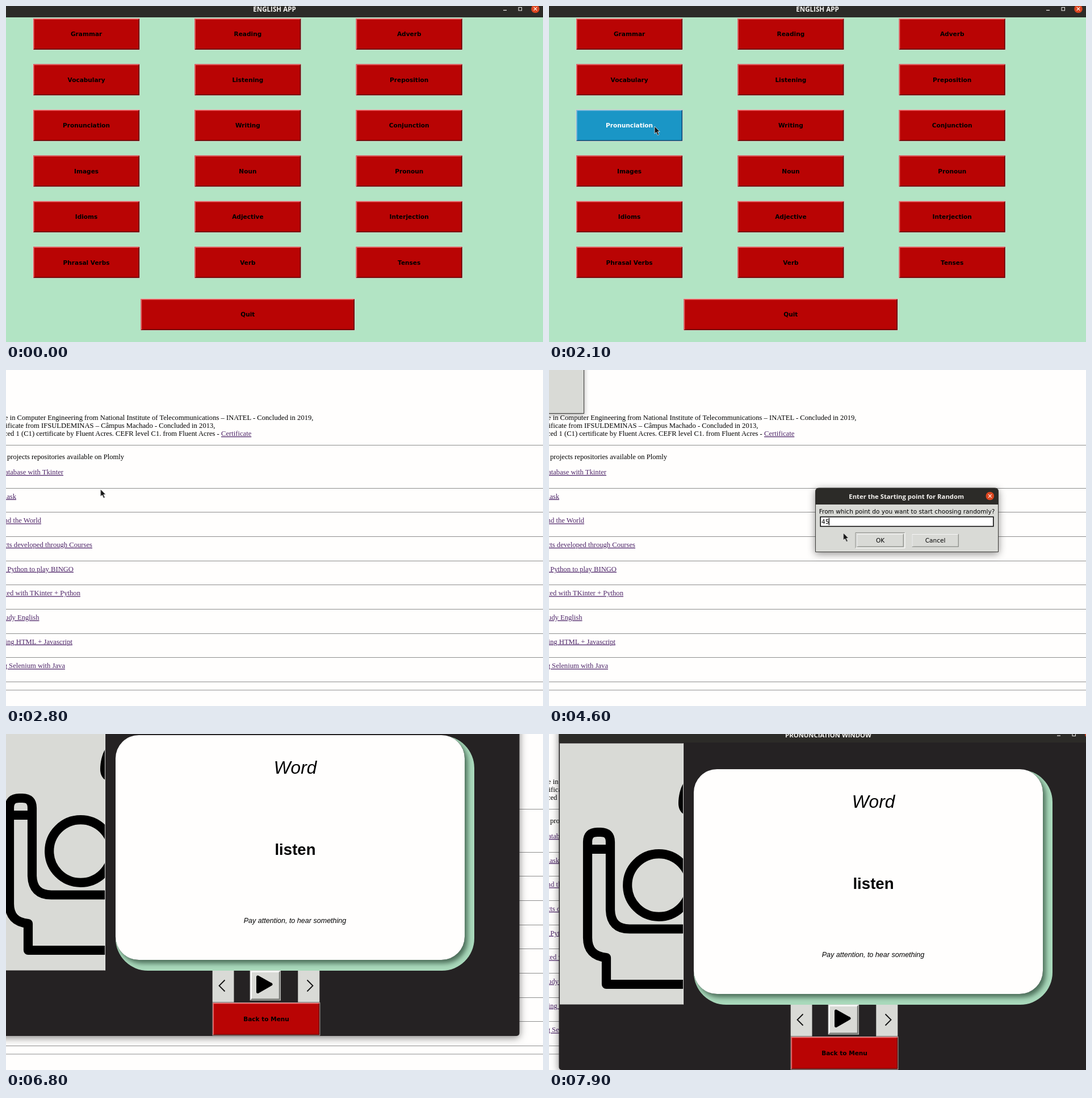
Write an HTML page that moves like this. It is 946x592 px and loops after 8000 ms.

```html
<!DOCTYPE html>
<html lang="en">
<head>
<meta charset="utf-8">
<title>English app</title>
<style>
html, body { margin: 0; width: 100%; height: 100%; overflow: hidden; background: #fffefd; }
svg { display: block; width: 946px; height: 592px; }
text { white-space: pre; }
.serif { font: 12.64px "Liberation Serif", serif; }
.link { fill: #4d2468; text-decoration: underline; }
.title { font: bold 11.3px "Open Sans", sans-serif; fill: #f6f4f1; }
.label { font: bold 10.55px "DejaVu Sans", sans-serif; }
.ui { font: 10.53px "DejaVu Sans", sans-serif; }
.sans { font-family: "Liberation Sans", sans-serif; }
.mid { text-anchor: middle; }
.end { text-anchor: end; }

/* one 8 s loop, 100 ms = 1.25 % */
#cursor, #menu, #buttons, #hover, #press, #dialog, #small, #player, #edge, #caret, #four, #five {
  animation: 8s step-end infinite;
}
#cursor { animation-name: cursor; }
#menu { animation-name: menu; }
#buttons { animation-name: buttons; }
#hover { animation-name: hover; }
#press { animation-name: press; }
#dialog { animation-name: dialog; transform-origin: 630px 264px; }
#small { animation-name: small; }
#player { animation-name: player; }
#edge { animation-name: edge; }
#caret { animation-name: caret; }
#four { animation-name: four; }
#five { animation-name: five; }

@keyframes cursor {
  0% { transform: translate(-50px, -50px); }
  3.75% { transform: translate(345px, 21px); }
  6.25% { transform: translate(291px, 174px); }
  10% { transform: translate(255px, 205px); }
  11.25% { transform: translate(232px, 222px); }
  12.5% { transform: translate(228px, 223px); }
  26.25% { transform: translate(186px, 212px); }
  27.5% { transform: translate(166.5px, 210px); }
  41.25% { transform: translate(215px, 150px); }
  42.5% { transform: translate(370px, 72px); }
  43.75% { transform: translate(-50px, -50px); }
  46.25% { transform: translate(513px, 282px); }
  50% { transform: translate(518.5px, 287px); }
  62.5% { transform: translate(524px, 290px); }
  63.75% { transform: translate(529px, 293px); }
  66.25% { transform: translate(548px, 297px); }
  67.5% { transform: translate(573px, 304px); }
  73.75% { transform: translate(470px, 296px); }
  75% { transform: translate(375px, 281px); }
  77.5% { transform: translate(329.5px, 84px); }
  80%, 100% { transform: translate(-50px, -50px); }
}
@keyframes menu { 0% { visibility: visible; } 35%, 100% { visibility: hidden; } }
@keyframes buttons { 0% { opacity: 1; } 32.5%, 100% { opacity: 0; } }
@keyframes hover { 0% { opacity: 0; } 11.25% { opacity: 1; } 32.5%, 100% { opacity: 0; } }
@keyframes press { 0% { opacity: 0; } 31.25% { opacity: 1; } 32.5%, 100% { opacity: 0; } }
@keyframes dialog {
  0% { opacity: 0; transform: scale(.9); }
  36.25% { opacity: .5; transform: scale(.95); }
  37.5% { opacity: 1; transform: none; }
  68.75% { opacity: .5; transform: scale(.95); }
  70%, 100% { opacity: 0; transform: scale(.9); }
}
@keyframes small { 0% { opacity: 0; } 36.25% { opacity: .5; } 37.5% { opacity: 1; } 70%, 100% { opacity: 0; } }
@keyframes player {
  0% { visibility: hidden; transform: none; }
  70% { visibility: visible; transform: translate(-115px, -98px); }
  83.75% { visibility: visible; transform: translate(-95px, -88px); }
  85% { visibility: visible; transform: translate(-62px, -60px); }
  86.25% { visibility: visible; transform: translate(-22px, -19px); }
  90% { visibility: visible; transform: translate(-16px, -14px); }
  91.25% { visibility: visible; transform: translate(-11px, -10px); }
  92.5% { visibility: visible; transform: translate(-7px, -6px); }
  93.75% { visibility: visible; transform: translate(-4px, -3px); }
  95% { visibility: visible; transform: translate(-2px, -1px); }
  98.75%, 100% { visibility: visible; transform: none; }
}
@keyframes edge {
  0% { filter: drop-shadow(0 1px 3px rgba(0, 0, 0, .2)); }
  83.75%, 100% { filter: drop-shadow(0 3px 7px rgba(0, 0, 0, .5)); }
}
@keyframes caret {
  0% { opacity: 0; transform: none; }
  43.75% { opacity: 1; transform: none; }
  46.25% { opacity: 0; transform: none; }
  53.75% { opacity: 1; transform: translateX(6.7px); }
  57.5% { opacity: 1; transform: translateX(13.2px); }
  62.5% { opacity: 0; transform: translateX(13.2px); }
  66.25%, 100% { opacity: 1; transform: translateX(13.2px); }
}
@keyframes four { 0% { opacity: 0; } 53.75%, 100% { opacity: 1; } }
@keyframes five { 0% { opacity: 0; } 57.5%, 100% { opacity: 1; } }
</style>
</head>
<body>
<svg viewBox="0 0 946 592">
  <defs>
    <clipPath id="cardClip"><rect x="255" y="63" width="632" height="414" rx="57"/></clipPath>
    <clipPath id="panelClip"><rect x="19" y="16.500" width="217.500" height="460"/></clipPath>
    <g id="controls">
      <path d="M876 7.500h6" stroke="#f2f0ed" stroke-width="1.200"/>
      <rect x="903" y="2.500" width="5.500" height="5.500" fill="none" stroke="#f2f0ed"/>
      <use href="#close" x="932.500" y="5"/>
    </g>
    <g id="close">
      <circle r="7.300" fill="#dc4620"/>
      <path d="M-2.800-2.800l5.600 5.600m0-5.600l-5.600 5.600" stroke="#fff" stroke-width="1.100"/>
    </g>
  </defs>

  <g id="page" class="serif">
    <rect width="946" height="592" fill="#fffefd"/>
    <text class="end" x="541.500" y="88">Degree in Computer Engineering from National Institute of Telecommunications – INATEL - Concluded in 2019,</text>
    <text class="end" x="368.500" y="102">Certificate from IFSULDEMINAS – Câmpus Machado - Concluded in 2013,</text>
    <text class="end" x="375.800" y="116">Advanced 1 (C1) certificate by Fluent Acres. CEFR level C1. from Fluent Acres -</text>
    <text class="link" x="379" y="116">Certificate</text>
    <text x="2" y="157">projects repositories available on Plomly</text>
  </g>

  <g id="small">
    <rect x="-97" y="-124" width="158.500" height="200.500" fill="#d9dad6" stroke="#3a3937" style="filter:drop-shadow(0 2px 4px rgba(0,0,0,.35))"/>
  </g>

  <g id="player">
    <rect id="edge" x="17.500" y="-14" width="949" height="606" rx="5" fill="#252223"/>
    <path d="M17.500 15V-8q0-6 6-6h937q6 0 6 6V15z" fill="#2c2b28"/>
    <text class="title mid" x="492" y="5.500">PRONUNCIATION WINDOW</text>
    <use href="#controls" x="19" y="-4.500"/>
    <rect x="19" y="16.500" width="218" height="460" fill="#d9dad6"/>
    <g clip-path="url(#panelClip)">
      <g fill="none" stroke="#000" stroke-width="16.200" stroke-linejoin="round">
        <path d="M240 441H101V394Q68 391 68 359V190Q68 173 85 173H91Q108 173 108 190V310Q109 343.500 142 343.500H240"/>
        <path d="M68 203H108"/>
        <circle cx="193.500" cy="266.500" r="55.300"/>
      </g>
      <path d="M240 82C232 92 228 108 228 122C228 132 232 139 240 143z"/>
    </g>
    <path d="M236.600 16.500V476.500" stroke="#f3f3f0" stroke-width=".8"/>
    <rect x="255" y="63" width="632" height="414" rx="57" fill="#a9d9bb"/>
    <g clip-path="url(#cardClip)">
      <rect x="255" y="62" width="615" height="396" rx="41" style="filter:drop-shadow(5px 6px 4px rgba(20,45,30,.62))"/>
    </g>
    <rect x="255" y="62" width="615" height="396" rx="41" fill="#fffefd"/>
    <g class="sans mid">
      <text x="571.500" y="130" font-size="31.600" font-style="italic">Word</text>
      <text x="571.500" y="273" font-size="27.600" font-weight="bold">listen</text>
      <text x="571" y="393" font-size="12.550" font-style="italic">Pay attention, to hear something</text>
    </g>
    <path d="M425.700 477h37.800v55.500h-37.800zM576.300 477h38v55.500h-38z" fill="#d9dad6"/>
    <path d="M447.500 493.500l-10 10 10 10M592.500 493.500l10 10-10 10" fill="none" stroke="#111" stroke-width="1.800"/>
    <g id="playerButtons"></g>
    <path d="M505.500 488V514.500L529 501z" stroke="#000" stroke-width="5" stroke-linejoin="round"/>
  </g>

  <g id="dialog">
    <path d="M469.500 320.500V214q0-6 6-6h310q6 0 6 6v106.500z" fill="#d9dad6" stroke="#3a3937" style="filter:drop-shadow(0 3px 7px rgba(0,0,0,.45))"/>
    <path d="M469.500 237V214q0-6 6-6h310q6 0 6 6V237z" fill="#2c2b28"/>
    <text class="title mid" x="629.700" y="227">Enter the Starting point for Random</text>
    <use href="#close" x="776.800" y="222"/>
    <rect x="478.200" y="258.700" width="304.600" height="16.800" fill="#fff" stroke="#000" stroke-width="1.500"/>
    <g class="ui">
      <text class="mid" x="630.500" y="253">From which point do you want to start choosing randomly?</text>
      <text id="four" x="480" y="270.500">4</text>
      <text id="five" x="486.700" y="270.500">5</text>
    </g>
    <path id="caret" d="M480.200 260.500V273.500" stroke="#000" stroke-width="1.400"/>
    <path d="M540 314V286.500H627" fill="none" stroke="#8f908c"/>
    <path d="M540 313.700H627V286.500" fill="none" stroke="#fff"/>
  </g>

  <g id="menu">
    <rect width="946" height="592" fill="#b2e4c4"/>
    <rect width="946" height="20" fill="#2c2b28"/>
    <text class="title mid" x="473" y="9.800" style="font-size:11.600px">ENGLISH APP</text>
    <use href="#controls"/>
    <g id="buttons"></g>
    <g id="hover"></g>
    <g id="press"></g>
  </g>

  <path id="cursor" d="M0 0V13L3 10.300L5.500 15.700L7.800 14.700L5.400 9.500H9.200z" fill="#141414" stroke="#fff" stroke-width=".7"/>
</svg>
<script>
const red = { fill: '#b90404', light: '#ee6567', dark: '#5e0202', rim: '#d9d5cd', ink: '#000' };
const blue = { fill: '#1a96c6', light: '#86bfdf', dark: '#0d4d72', rim: '#d9d5cd', ink: '#fff' };
const sunk = { ...blue, light: blue.dark, dark: blue.light };
const gray = { fill: '#d9dad6', light: '#fff', dark: '#777874', rim: '#d9dad6', ink: '#000' };

const add = (id, markup) => document.getElementById(id).insertAdjacentHTML('beforeend', markup);

// Raised button: rim, dark lower right, light upper left, face and label
function button(x, y, w, h, label, look, type = 'label', bevel = 1.6) {
  const rim = .8, m = rim + bevel;
  const box = (d, fill) => `<rect x="${x + d}" y="${y + d}" width="${w - 2 * d}" height="${h - 2 * d}" fill="${fill}"/>`;
  const corner = `M${x + rim} ${y + h - rim}V${y + rim}H${x + w - rim}L${x + w - m} ${y + m}L${x + m} ${y + h - m}z`;
  return box(0, look.rim) + box(rim, look.dark) + `<path d="${corner}" fill="${look.light}"/>` + box(m, look.fill) +
    `<text class="${type} mid" x="${x + w / 2}" y="${y + h / 2 + 3.8}" fill="${look.ink}">${label}</text>`;
}

const columns = [
  ['Grammar', 'Vocabulary', 'Pronunciation', 'Images', 'Idioms', 'Phrasal Verbs'],
  ['Reading', 'Listening', 'Writing', 'Noun', 'Adjective', 'Verb'],
  ['Adverb', 'Preposition', 'Conjunction', 'Pronoun', 'Interjection', 'Tenses']
];
const cell = (c, r, look) => button(47.3 + 284.3 * c, 21.3 + 80.45 * r, 188.6, 56.4, columns[c][r], look);
columns.forEach((names, c) => names.forEach((_, r) => add('buttons', cell(c, r, red))));
add('buttons', button(236.8, 515.3, 378, 56.6, 'Quit', red));
add('hover', cell(0, 2, blue));
add('press', cell(0, 2, sunk));

add('playerButtons', button(491.7, 476.5, 54.3, 53, '', gray, 'label', 2.4) +
  button(425.7, 533, 189.6, 58.3, 'Back to Menu', red));
add('dialog', button(541.5, 288, 84, 24.5, 'OK', gray, 'ui', 1) +
  button(638.5, 288, 84, 24.5, 'Cancel', gray, 'ui', 1));

const rules = [132.5, 564];
const links = [
  ['Database with Tkinter', 101], ['Flask', 18], ['Around the World', 62],
  ['Projects developed through Courses', 152], ['with Python to play BINGO', 119],
  ['Created with TKinter + Python', 131], ['Study English', 58.5],
  ['Using HTML + Javascript', 117], ['using Selenium with Java', 104]
];
links.forEach(([name, right], i) => {
  add('page', `<text class="link end" x="${right}" y="${184 + 42.67 * i}">${name}</text>`);
  rules.push(Math.floor(208.2 + 42.67 * i) + .5);
});
rules.forEach(y => add('page', `<path d="M0 ${y}H946" stroke="#8d8d8d"/>`));
</script>
</body>
</html>
```
